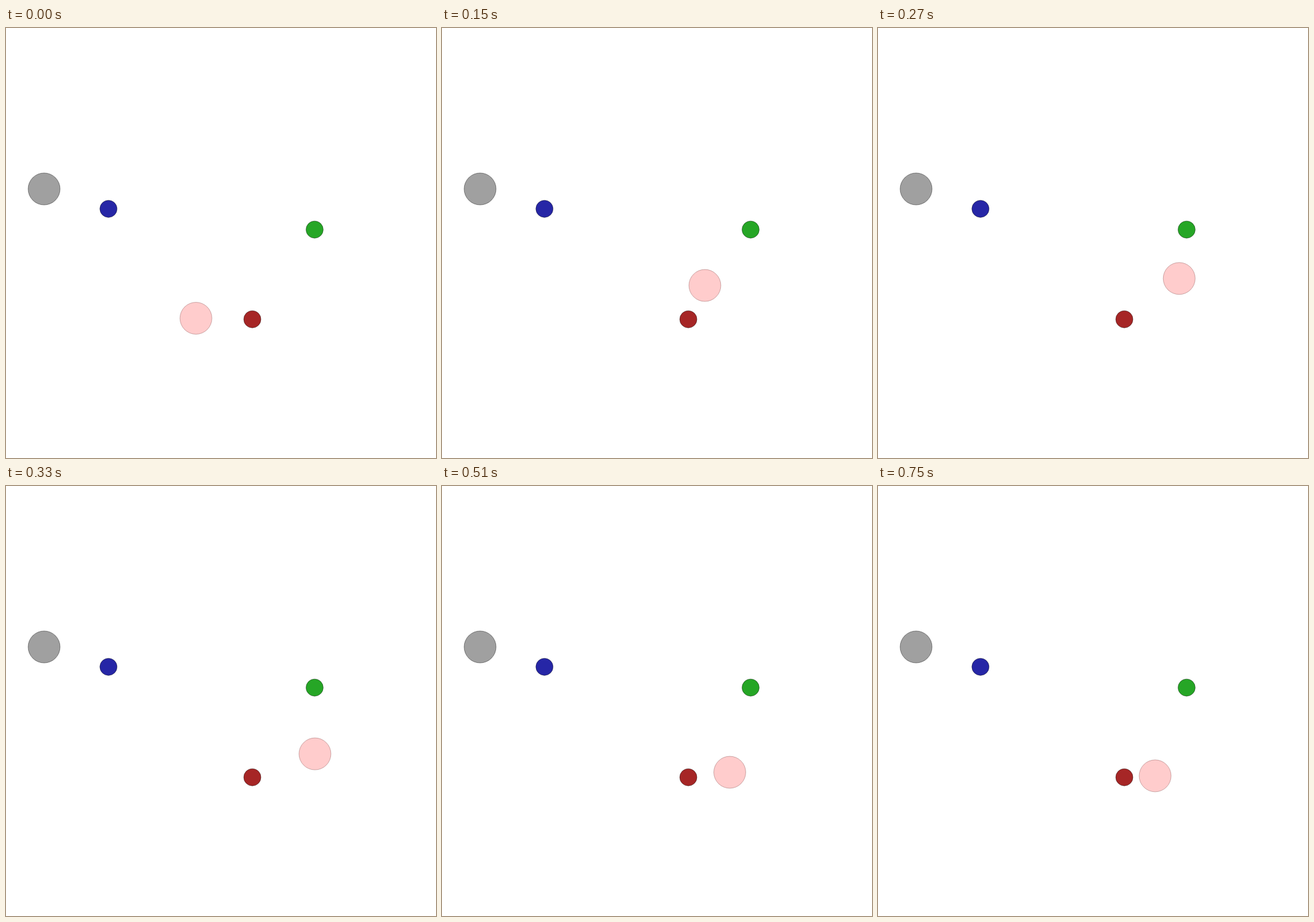
Animation of 700x700 px, one loop 780 ms. Source, as an HTML page with a canvas:

```html
<!DOCTYPE html>
<html lang="en">
<head>
<meta charset="utf-8">
<title>Circles on a grid</title>
<style>
  html, body { margin: 0; width: 100%; height: 100%; overflow: hidden; background: #fff; }
  canvas { display: block; }
</style>
</head>
<body>
<canvas id="stage" width="700" height="700"></canvas>
<script>
const ctx = document.getElementById('stage').getContext('2d');
const STEP_MS = 30, STEPS = 26, CELL = 70, EASE = 0.25;
const START = { x: 309.2, y: 472.5 };

// Target cell relative to the start, valid from the given step on.
const TARGETS = [
  { from: 1, col: 1, row: -1 },
  { from: 2, col: 2, row: -1 },
  { from: 5, col: 3, row: -1 },
  { from: 10, col: 3, row: 0 },
  { from: 14, col: 2, row: 0 }
];

const DISCS = [
  { x: 62, y: 262, r: 26, fill: '#a0a0a0' },
  { x: 166.8, y: 294.4, r: 14, fill: '#2626a6' },
  { x: 502.4, y: 328.2, r: 14, fill: '#26a626' },
  { x: 401, y: 474.2, r: 14, fill: '#a62626' }
];

function walkerAt(step) {
  let { x, y } = START;
  for (let i = 1; i <= step; i++) {
    const target = TARGETS.filter(t => t.from <= i).pop();
    x += (START.x + target.col * CELL - x) * EASE;
    y += (START.y + target.row * CELL - y) * EASE;
  }
  return { x, y, r: 26, fill: '#ffcccc', stroke: 'rgba(90, 20, 20, 0.3)' };
}

function drawDisc({ x, y, r, fill, stroke = 'rgba(0, 0, 0, 0.4)' }) {
  ctx.beginPath();
  ctx.arc(x, y, r, 0, Math.PI * 2);
  ctx.fillStyle = fill;
  ctx.fill();
  ctx.strokeStyle = stroke;
  ctx.lineWidth = 1;
  ctx.stroke();
}

function render(ms) {
  const step = Math.floor(ms / STEP_MS) % STEPS;
  ctx.fillStyle = '#fff';
  ctx.fillRect(0, 0, 700, 700);
  DISCS.forEach(drawDisc);
  drawDisc(walkerAt(step));
}

const began = performance.now();
function tick() {
  render(performance.now() - began);
  requestAnimationFrame(tick);
}
tick();
</script>
</body>
</html>
```
